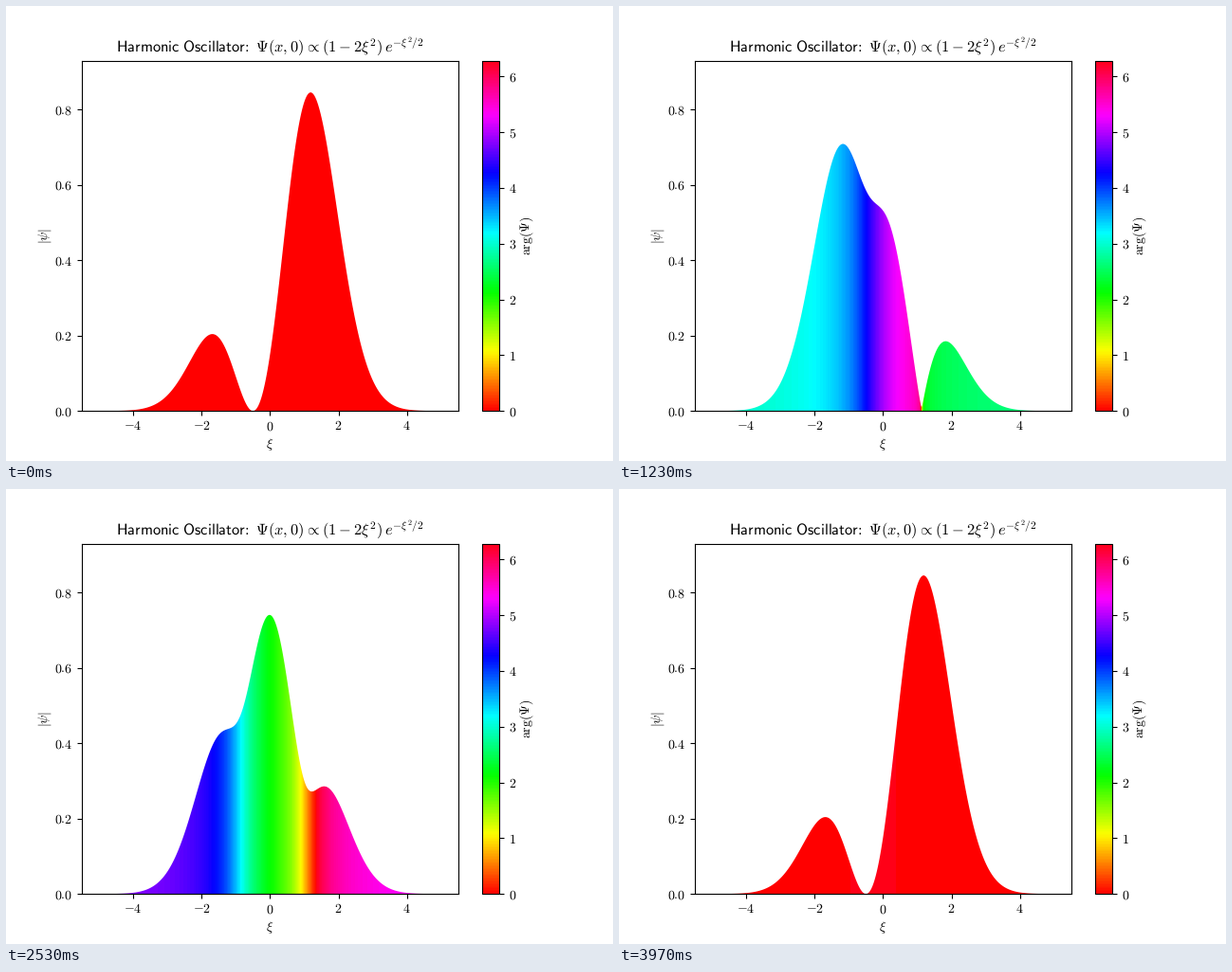
Write a matplotlib script that moves like this. It is 640x480 px and loops after 4.01 s.

```python
import numpy as np
import matplotlib.pyplot as plt
from matplotlib.animation import FuncAnimation
from matplotlib.path import Path

plt.rcParams.update({"mathtext.fontset": "cm",
                     "font.family": "Liberation Serif",
                     "text.hinting": "no_hinting"})

LOOP_MS = 4010
FRAMES = 200
TICK_MS = LOOP_MS / FRAMES
STEPS = 120
STEP_MS = 100 / 3
XMAX = 5.5

xi = np.linspace(-XMAX, XMAX, 1101)
gauss = np.pi ** -0.25 * np.exp(-xi ** 2 / 2) / 5
# (1 + 2 xi)^2 expanded in Hermite polynomials: 3 H0 + 2 H1 + H2
modes = [3 * gauss, 4 * xi * gauss, (4 * xi ** 2 - 2) * gauss]
times = np.linspace(0, 4 * np.pi, STEPS)


def wave(t):
    return sum(m * np.exp(-1j * (n + 0.5) * t) for n, m in enumerate(modes))


def outline(height):
    xs = np.r_[xi[0], xi, xi[-1], xi[0]]
    ys = np.r_[0, height, 0, 0]
    return Path(np.column_stack([xs, ys]), closed=True)


ymax = 1.1 * np.abs(wave(0)).max()

fig, ax = plt.subplots(figsize=(6.4, 4.8), dpi=100)
im = ax.imshow(np.zeros((1, xi.size)), cmap="hsv", vmin=0, vmax=2 * np.pi,
               extent=(-XMAX, XMAX, 0, ymax), aspect="auto",
               interpolation="nearest")
ax.set_xlim(-XMAX, XMAX)
ax.set_ylim(0, ymax)
ax.set_xticks([-4, -2, 0, 2, 4])
ax.set_yticks([0, 0.2, 0.4, 0.6, 0.8])
ax.xaxis.set_major_formatter("${x:.0f}$")
ax.yaxis.set_major_formatter("${x:.1f}$")
ax.set_xlabel(r"$\xi$", labelpad=3)
ax.set_ylabel(r"$|\psi|$", labelpad=1)
ax.set_title(r"$\mathsf{Harmonic\ Oscillator\!:}\;\Psi(x,0)"
             r"\hspace{0.04}\propto\hspace{0.04}(1-2\xi^2)\,e^{-\xi^2/2}$",
             fontsize=11.8)

bar = fig.colorbar(im, ax=ax, format="${x:.0f}$")
bar.set_label(r"$\arg(\Psi)$", labelpad=1.5)


def update(i):
    # the wave advances in discrete steps, 30 per second
    step = min(int((i + 1) * TICK_MS / STEP_MS + 0.1), STEPS - 1)
    psi = wave(times[step])
    im.set_data((np.angle(psi) % (2 * np.pi))[None, :])
    im.set_clip_path(outline(np.abs(psi)), ax.transData)
    return [im]


anim = FuncAnimation(fig, update, frames=FRAMES, interval=TICK_MS, repeat=True)
plt.show()
```
